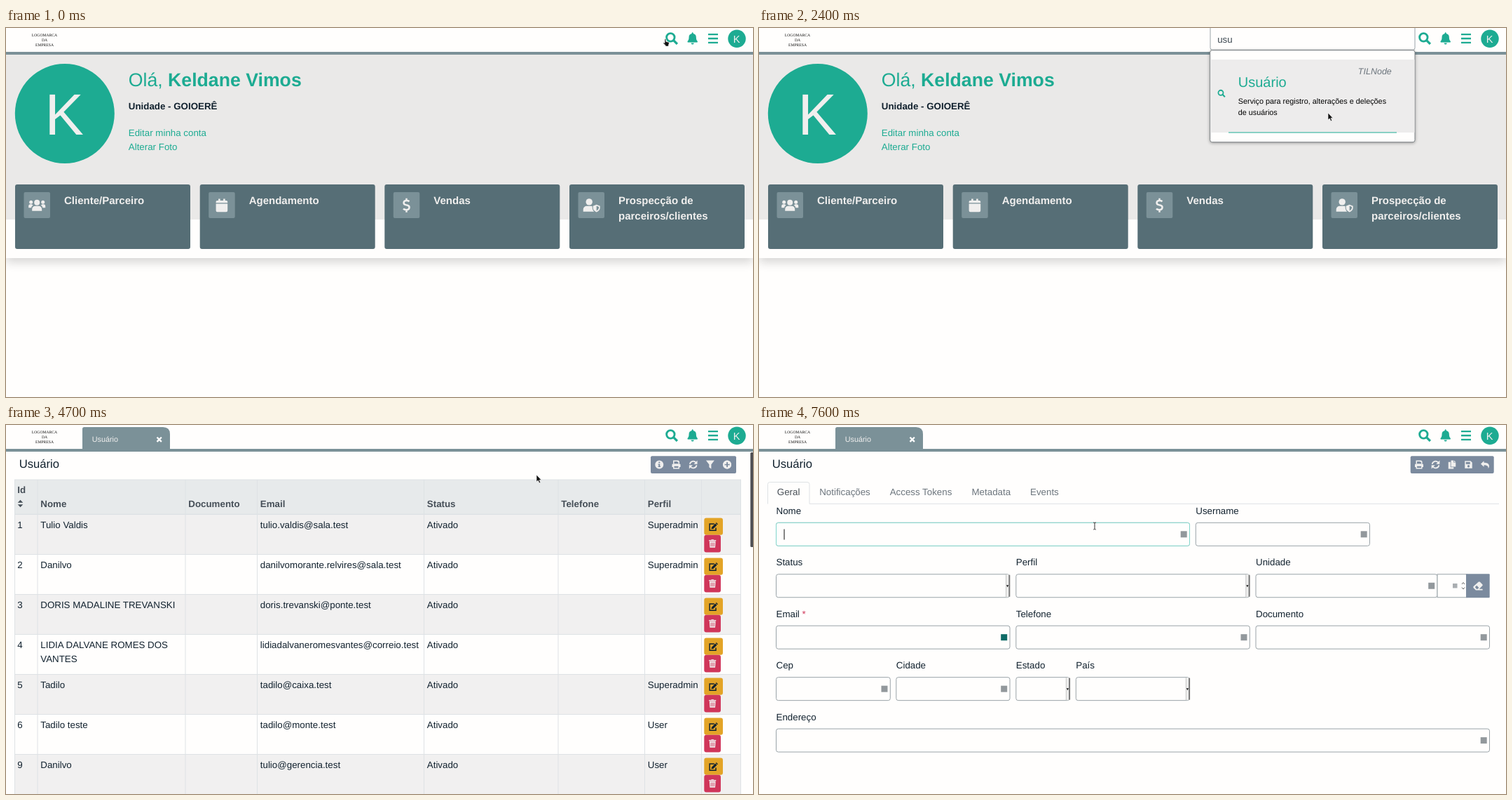
An HTML page that plays this animation: 1066 px wide and 526 px high, repeating every 8000 ms.

```html
<!DOCTYPE html>
<html lang="pt-BR">
<head>
<meta charset="utf-8">
<title>Usuário</title>
<style>
  html, body { margin: 0; width: 100%; height: 100%; overflow: hidden; background: #fffefd; }
  svg { display: block; width: 1066px; height: 526px; }
  text { font-family: "Liberation Sans", Arial, sans-serif; text-rendering: geometricPrecision; white-space: pre; }
</style>
</head>
<body>
<svg id="stage" viewBox="0 0 1066 526"></svg>
<script>
const LOOP = 8000, STEP = 100;
const BG = '#fffefd', TEAL = '#1dab92', INK = '#12222f', SLATE = '#566e76',
  BAR = '#7b9198', TOOL = '#7b8a9e', LINE = '#dee2e5', FIELD = '#9aa3a8', PALE = '#f0efee';

const text = (x, y, str, { size = 13.33, fill = INK, attrs = '' } = {}) =>
  `<text x="${x}" y="${y}" font-size="${size}" fill="${fill}" ${attrs}>${str}</text>`;
const rect = (x, y, w, h, fill, attrs = '') =>
  `<rect x="${x}" y="${y}" width="${w}" height="${h}" fill="${fill}" ${attrs}/>`;
const line = (x1, y1, x2, y2, color, width = 1) =>
  `<path d="M${x1} ${y1}L${x2} ${y2}" stroke="${color}" stroke-width="${width}"/>`;
const group = (id, body, attrs = '') => `<g id="${id}" ${attrs}>${body}</g>`;
const BOLD = 'font-weight="bold"', MID = 'text-anchor="middle"', END = 'text-anchor="end"';

// Icons are centred on 0,0 in a box of about 16 units.
const stroke = (d, w) => `<path d="${d}" fill="none" stroke="currentColor" stroke-width="${w}"/>`;
const fill = d => `<path d="${d}" fill-rule="evenodd"/>`;
const ICONS = {
  search: '<circle cx="-1.5" cy="-1.5" r="5.2" fill="none" stroke="currentColor" stroke-width="2.6"/>' + stroke('M2.2 2.2L7.2 7.2', 3),
  bell: fill('M-1-7.2a1 1 0 0 1 2 0v.7a5 5 0 0 1 4 5C5 2 6 3 6.8 4a1 1 0 0 1-.8 1.6H-6A1 1 0 0 1-6.8 4C-6 3-5 2-5-1.500a5 5 0 0 1 4-5zM-2 6.500H2a2 2 0 0 1-4 0z'),
  bars: stroke('M-7-5.800H7M-7 0H7M-7 5.800H7', 2.3),
  users: '<circle cy="-4" r="4"/><circle cx="-8.500" cy="-4.500" r="2.500"/><circle cx="8.500" cy="-4.500" r="2.500"/>' +
    fill('M-7 8V5.500A4.500 4.500 0 0 1-2.500 1h5A4.500 4.500 0 0 1 7 5.500V8zM-12 3V1a2.500 2.500 0 0 1 2.500-2.500h2L-5.500 0Q-8 1-8 3.500h-4zM12 3V1a2.500 2.500 0 0 0-2.500-2.500h-2L5.500 0Q8 1 8 3.500h4z'),
  calendar: fill('M-8.300-4.500a2 2 0 0 1 2-2.300h1.500V-9.300h2.600v2.500h4.400v-2.500h2.600v2.500h1.500a2 2 0 0 1 2 2.300v1H-8.300zM-8.300-2.300H8.300v9.800a2 2 0 0 1-2 2H-6.300a2 2 0 0 1-2-2z'),
  dollar: stroke('M4-5.500Q2.500-6.700 0-6.700C-5-6.700-5-1.500-1-.6L1.500.1C5.500 1.300 4.500 6.500 0 6.500Q-3 6.500-4.500 5M0-10V-6M0 6V10', 2.5),
  shield: '<circle cx="-3" cy="-4.800" r="4.700"/>' +
    fill('M-11.500 9V6A5 5 0 0 1-6.500 1H0Q1 1 1.500 1.500V4Q2 7 4 9zM2.500 1L7.500-1l5 2v2.500q0 4-5 6.200q-5-2.200-5-6.200zM7.500.7v7q3.300-1.700 3.300-4.500v-1z'),
  info: fill('M-8 0A8 8 0 1 1 8 0A8 8 0 1 1-8 0zM-1.300-5.500h2.600v2.600h-2.600zM-2.200-1.500h3.500v4.500h1v1.800h-4.600V3h1V.3h-.9z'),
  print: fill('M-6-8H4L6-6v5H-6zM-4-6v4h8v-3H2v-1zM-8 0a1.500 1.500 0 0 1 1.500-1.500h13A1.500 1.500 0 0 1 8 0v4.500H6V8H-6V4.500h-2zM-4 3v3h8V3z'),
  sync: stroke('M-6.500-1A6.500 6.500 0 0 1 5-4M6.500 1A6.500 6.500 0 0 1-5 4', 2.3) + fill('M7.800-8v7H1zM-7.800 8V1H-1z'),
  filter: fill('M-8-8H8L2-.500V8L-2 5V-.500z'),
  plus: fill('M-8 0A8 8 0 1 1 8 0A8 8 0 1 1-8 0zM-1.300-5v3.700H-5v2.600h3.700V5h2.600V1.300H5v-2.600H1.300V-5z'),
  copy: fill('M-2-8H3v4h4v8H-2zM4-8l3 3H4zM-7-5h4V5h6v3H-7z'),
  save: fill('M-7-7H4L7-4V7H-7zM-5-5v4h8v-4zM-2.200 3a2.200 2.200 0 1 0 4.400 0a2.200 2.200 0 1 0-4.400 0z'),
  reply: fill('M-8-1.500L-2-7v3.300C4-3.700 8-2 8 3q0 2.500-2 4.300C7 3 4 1-2 1v3.300z'),
  eraser: fill('M-7.500 1L1-6.500h2L7.500-2v1.500L2 5h5.500v2H-3.500L-7.500 3zM-4.700 2L-2.500 5H-.5L1.500 3-2-.500z'),
  edit: stroke('M2-5.500H-7V7H5V2', 2) + fill('M-3 1L4-6 7-3 0 4-3.800 4.500zM4.700-6.700L6-8 9-5 7.700-3.700z'),
  trash: fill('M-7-7h4l1-1h4l1 1h4v2H-7zM-6-4H6L5.300 8H-5.300zM-3.500-2V6h1.200v-8zM-.6-2V6H.6v-8zM2.300-2V6h1.200v-8z'),
  sort: fill('M-5-1.500L0-7 5-1.500zM-5 1.500L0 7 5 1.500z'),
  close: stroke('M-5-5L5 5M5-5L-5 5', 3.6)
};
const icon = (name, x, y, scale, color) =>
  `<g transform="translate(${x} ${y}) scale(${scale})" fill="${color}" color="${color}">${ICONS[name]}</g>`;

const header = rect(0, 0, 1066, 34, BG) + rect(0, 34, 1066, 4, BAR) +
  ['LOGOMARCA', 'DA', 'EMPRESA'].map((s, i) => `<text x="55" y="${12 + i * 6.8}" font-size="5.65" text-anchor="middle" fill="#111" style="font-family:'Liberation Serif',serif">${s}</text>`).join('') +
  icon('search', 950, 15, 1.1, TEAL) + icon('bell', 979.7, 14.7, 1.03, TEAL) + icon('bars', 1009, 15, 1, TEAL) +
  `<circle cx="1043" cy="15.300" r="12.700" fill="${TEAL}"/>` + text(1042.7, 20.5, 'K', { size: 14.6, fill: PALE, attrs: MID });

const card = (x, glyph, ...lines) =>
  rect(x, 223, 250, 92, SLATE, 'rx="3"') + rect(x + 12.5, 234, 37.5, 37, BAR, 'rx="2"') +
  icon(glyph, x + 31.2, 252.7, 1, PALE) +
  lines.map((s, i) => text(x + 70, 250.5 + i * 22.4, s, { size: 15, fill: PALE, attrs: BOLD })).join('');

const home = rect(0, 38, 1066, 290, BG, 'style="filter:drop-shadow(0 6.700px 6.700px rgba(0,0,0,.16))"') +
  rect(0, 38, 1066, 235, '#eae9e8') +
  `<circle cx="83.800" cy="122" r="71" fill="${TEAL}"/>` + text(83.3, 152, 'K', { size: 83, fill: PALE, attrs: MID }) +
  text(174.8, 83, `Olá, <tspan ${BOLD}>Keldane Vimos</tspan>`, { size: 26.67, fill: TEAL }) +
  text(174.8, 116, 'Unidade - GOIOERÊ', { attrs: BOLD }) +
  text(174.8, 154, 'Editar minha conta', { fill: TEAL }) + text(174.8, 174, 'Alterar Foto', { fill: TEAL }) +
  card(13, 'users', 'Cliente/Parceiro') + card(276.7, 'calendar', 'Agendamento') +
  card(540.3, 'dollar', 'Vendas') + card(804, 'shield', 'Prospecção de', 'parceiros/clientes');

const results = rect(643.7, 31.7, 292.3, 131, BG, 'rx="3" stroke="#7d8285" style="filter:drop-shadow(0 1px 2px rgba(0,0,0,.35))"') +
  rect(644.2, 45, 291.3, 104, '#edecec') + line(670, 149, 910, 149, TEAL) +
  icon('search', 660, 93.3, .68, TEAL) +
  text(902.8, 65.5, 'TILNode', { size: 12.5, fill: '#6c757d', attrs: `${END} font-style="italic"` }) +
  text(683.8, 84, 'Usuário', { size: 20, fill: TEAL }) +
  text(683.8, 108, 'Serviço para registro, alterações e deleções', { size: 10.83, fill: '#000' }) +
  text(683.8, 124, 'de usuários', { size: 10.83, fill: '#000' });

const pageTab = `<path d="M109 34V5.500Q109 3 111.500 3H224Q234 3 234 13V34z" fill="${BAR}"/>` +
  text(122.7, 23.5, 'Usuário', { size: 10.83, fill: PALE }) + icon('close', 218.7, 20.7, .64, '#fff');
const title = text(18.7, 61, 'Usuário', { size: 16.67 });

const toolbar = (x, w, pitch, names) => rect(x, 44.3, w, 24.7, TOOL, 'rx="2"') +
  names.map((n, i) => icon(n, x + 12.3 + i * pitch, 56.5, .75, PALE)).join('');
const listTools = x => toolbar(x, 122, 24.2, ['info', 'print', 'sync', 'filter', 'plus']);
const heading = (x, y, s) => text(x, y, s, { fill: '#464f58', attrs: BOLD });

const NAMES = ['Id', 'Nome', 'Documento', 'Email', 'Status', 'Telefone', 'Perfil'];
const loadingX = [16.5, 117.5, 246, 477, 601.3, 741, 917];
const loading = title + listTools(927) + rect(12, 78, 1044, 29.5, '#e7eaeb') +
  line(12, 78, 1056, 78, LINE) + line(12, 107.5, 1056, 107.5, '#d4d9dc') +
  line(597, 78, 597, 107, LINE) + line(1029, 78, 1029, 107, LINE) +
  NAMES.map((s, i) => heading(loadingX[i], 97, s)).join('') + icon('sort', 39.7, 92, .78, '#464f58') +
  text(18.7, 142.7, 'Página de') + text(894, 144.3, 'Mostrando') + text(1020.5, 144.3, 'de') +
  rect(961, 128, 56, 23, '#e9ebee', 'rx="2"') + text(969.5, 144.3, '25') +
  '<path d="M1004 138l2.800 2.800 2.800-2.800" fill="none" stroke="#333" stroke-width="1.300"/>' +
  rect(0, 38, 1066, 488, BG, 'opacity=".5"') +
  `<circle cx="533.500" cy="281.500" r="25.200" fill="none" stroke="#c5e7e2" stroke-width="3"/>
   <path id="arc" d="M515.700 263.700A25.200 25.200 0 0 1 551.300 263.700" fill="none" stroke="${TEAL}" stroke-width="3"/>`;

const EDGES = [12.5, 45, 256, 358.5, 596.5, 788, 911.5, 992.5, 1048.5];
const PEOPLE = [
  [1, 'Tulio Valdis', 'tulio.valdis@sala.test', 'Superadmin'],
  [2, 'Danilvo', 'danilvomorante.relvires@sala.test', 'Superadmin'],
  [3, 'DORIS MADALINE TREVANSKI', 'doris.trevanski@ponte.test', ''],
  [4, 'LIDIA DALVANE ROMES DOS|VANTES', 'lidiadalvaneromesvantes@correio.test', ''],
  [5, 'Tadilo', 'tadilo@caixa.test', 'Superadmin'],
  [6, 'Tadilo teste', 'tadilo@monte.test', 'User'],
  [9, 'Danilvo', 'tulio@gerencia.test', 'User']
];
const cellX = i => EDGES[i] + 4.3;
const person = ([id, name, mail, role], i) => {
  const y = 127.5 + i * 57, base = y + 19.500;
  return rect(12, y, 1037, 57, i % 2 ? BG : '#f1f0f0') + line(12, y, 1049, y, LINE) +
    text(cellX(0) - .5, base, id) +
    name.split('|').map((s, n) => text(cellX(1), base + n * 20, s)).join('') +
    text(cellX(3), base, mail) + text(cellX(4), base, 'Ativado') + text(cellX(6), base, role) +
    rect(996.3, y + 5, 26.7, 24.3, '#e3a427', 'rx="3"') + icon('edit', 1009.3, y + 17.5, .74, INK) +
    rect(996.3, y + 29.3, 23.7, 24.7, '#d0365a', 'rx="3"') + icon('trash', 1008.2, y + 41.5, .72, PALE);
};
const list = title + listTools(920) +
  rect(1017, 44.3, 25, 24.7, '#56657a', 'id="hover" rx="2"') +
  rect(1015.7, 43.1, 27.6, 27.2, 'none', 'id="ring" rx="3" stroke="#7b8a9e" stroke-opacity=".5" stroke-width="2.700"') +
  icon('plus', 1029.1, 56.5, .75, PALE) +
  rect(12, 78, 1037, 49.5, '#e7eaeb') + PEOPLE.map(person).join('') +
  NAMES.map((s, i) => heading(cellX(i) - (i ? 0 : .5), i ? 117 : 97, s)).join('') + icon('sort', 20.5, 112, .76, '#464f58') +
  EDGES.map(x => line(x, 78, x, 526, LINE)).join('') + line(12, 78, 1049, 78, LINE) + line(12, 127, 1049, 127, LINE) +
  rect(1062.3, 39, 5, 135, '#4d4e52', 'rx="1.500"');

// Each field: label, row, left, right, kind.
const FIELDS = [
  ['Nome', 0, 24.5, 614.5], ['Username', 0, 623.3, 871.5],
  ['Status', 1, 24.5, 357.5, 'select'], ['Perfil', 1, 366.8, 699.8, 'select'], ['Unidade', 1, 709, 968],
  ['Email', 2, 24.5, 358], ['Telefone', 2, 366.8, 700.3], ['Documento', 2, 709, 1042.5],
  ['Cep', 3, 24.5, 187.3], ['Cidade', 3, 195.8, 358],
  ['Estado', 3, 366.8, 443.3, 'select'], ['País', 3, 452.3, 614.3, 'select'], ['Endereço', 4, 24.5, 1042.5]
];
const rowY = row => 139.3 + row * 73.45;
const box = (x, y, w, color = FIELD) => rect(x, y, w, 33, BG, `rx="3" stroke="${color}"`);
const field = ([label, row, x1, x2, kind]) => {
  const y = rowY(row);
  return text(x1, y - 12.3, label === 'Email' ? 'Email <tspan fill="#d0365a">*</tspan>' : label) + box(x1, y, x2 - x1) +
    (kind ? rect(x2 - 5, y + .5, 4, 32, '#eeeeed') + line(x2 - 5, y + .5, x2 - 5, y + 32.5, '#bbb', .8) +
      line(x2 - .2, y + 1, x2 - .2, y + 32, '#777', 2) +
      `<path d="M${x2 - 4.500} ${y + 15.500}h3.200l-1.600 3z" fill="#111"/>` : '');
};
const badge = ([label, row, , x2, kind]) =>
  kind ? '' : rect(x2 - 12.8, rowY(row) + 12, 9, 9, label === 'Email' ? '#0f6b66' : '#92989c');

const TABS = [['Notificações', 86.2], ['Access Tokens', 186.7], ['Metadata', 303.5], ['Events', 387]];
const form = title + toolbar(929.7, 119, 23.5, ['print', 'sync', 'copy', 'save', 'reply']) +
  `<path d="M12.500 112.500V84.500Q12.500 81.500 15.500 81.500H69Q72 81.500 72 84.500V112.300H1056" fill="none" stroke="${LINE}"/>` +
  text(25.8, 100, 'Geral', { fill: '#495057' }) + TABS.map(([s, x]) => text(x, 100, s, { fill: '#6c757d' })).join('') +
  FIELDS.map(field).join('') + rect(968, rowY(1), 42, 33, BG, `stroke="${FIELD}"`) +
  '<path d="M1003 227l2-2.500 2 2.500M1003 231.500l2 2.500 2-2.500" fill="none" stroke="#555" stroke-width=".9"/>' +
  rect(1009, rowY(1) - .5, 33.7, 34, TOOL, 'rx="1"') + icon('eraser', 1026, rowY(1) + 16.5, .88, PALE) +
  group('focus', box(24.5, rowY(0), 590, '#7fd6cb') + line(36, 148.5, 36, 163.5, '#222', 1.1)) +
  group('badges', FIELDS.map(badge).join('') + rect(990, rowY(1) + 13.2, 6.5, 6.5, '#a9aeb1'));

const status = '<path d="M0 513H201Q203.500 513 203.500 515.500V526H0z" fill="#2d2d30"/>' +
  `<text x="2" y="524" font-size="9.300" fill="#f2f2f2" style="font-family:'Noto Sans',sans-serif">Read dev.gestao.plus</text>`;

const cursors =
  group('arrow', '<path d="M0 0V10L2.300 8 4 11.800 5.700 11 4.100 7.400H7z" fill="#111" stroke="#fff" stroke-width=".6"/>') +
  group('hand', '<path d="M2.500 1Q3.500 0 4.300 1V4.300L8 5.300Q9 5.600 8.800 7L8 9V11H3.500V9.500L.5 7Q0 6 1.200 5.800L2.500 6.500z" fill="#111" stroke="#fff" stroke-width=".6"/>') +
  group('beam', '<path d="M.5 0Q2 0 2.500.8Q3 0 4.500 0M2.500.8V9.200M.5 10Q2 10 2.500 9.200Q3 10 4.500 10" fill="none" stroke="#555" stroke-width="1.200"/>');

const stage = document.getElementById('stage');
stage.innerHTML = rect(0, 0, 1066, 526, BG) + group('home', home) + group('loading', loading) +
  group('list', list) + group('form', form) + header + group('pageTab', pageTab) +
  group('search', rect(644, -3, 292, 34.3, BG, 'id="searchBox" rx="3"') +
    text(654.2, 20.7, '', { fill: '#3f4a52', attrs: 'id="query"' }) +
    rect(654, 8.5, 1, 15, '#222', 'id="caret"')) +
  group('results', results) + group('status', status) + group('cursor', cursors);

const el = Object.fromEntries([...stage.querySelectorAll('[id]')].map(n => [n.id, n]));
const show = (id, on) => { el[id].style.display = on ? '' : 'none'; };
const between = (t, a, b) => t >= a && t < b;

const PATH = [
  [0, 937.5, 15], [1700, 937.5, 15], [2000, 893, 353], [2100, 893, 353], [2400, 812, 121], [2700, 812, 121],
  [3400, 538, 87], [3800, 538, 87], [4200, 422, 111], [4600, 422, 111], [4700, 757, 71], [4800, 754, 71],
  [4900, 754, 71], [5000, 1037, 73], [5100, 1037, 73], [5400, 1026.5, 56], [6300, 1026.5, 56],
  [6600, 840, 106], [6700, 840, 106], [7500, 476.5, 139], [LOOP, 476.5, 139]
];
function pointer(t) {
  const i = PATH.findIndex(p => p[0] > t), [t0, x0, y0] = PATH[i - 1], [t1, x1, y1] = PATH[i];
  const k = (t - t0) / (t1 - t0);
  return [x0 + (x1 - x0) * k, y0 + (y1 - y0) * k];
}

function render(time) {
  const t = Math.floor(time / STEP) * STEP;
  show('home', t < 2500);
  show('pageTab', t >= 2500);
  show('loading', between(t, 2800, 3600));
  show('list', between(t, 3600, 6300));
  show('form', t >= 6300);
  show('status', between(t, 2500, 2800) || between(t, 5700, 6400));

  show('search', between(t, 600, 2500));
  const width = 292 * Math.min(1, (t - 500) / 300);
  el.searchBox.setAttribute('width', Math.max(0, width));
  el.searchBox.setAttribute('x', 936 - width);
  el.searchBox.setAttribute('stroke', t < 2400 ? '#86d5cd' : FIELD);
  const typed = Math.max(0, Math.min(3, (t - 900) / STEP));
  el.query.textContent = 'usu'.slice(0, typed);
  el.caret.setAttribute('x', 654.2 + [0, 7.4, 14.1, 21.7][typed | 0]);
  show('caret', between(t, 800, 2400));
  show('results', between(t, 1200, 2500));

  el.arc.setAttribute('transform', `rotate(${(t - 3400) * .36 - 39} 533.5 281.5)`);
  show('hover', t >= 5200);
  show('ring', t >= 5700);
  show('focus', t >= 7400);
  show('badges', t >= 7000);

  const kind = t < 1800 || between(t, 5200, 6400) ? 'hand' : t >= 7300 ? 'beam' : 'arrow';
  for (const id of ['arrow', 'hand', 'beam']) show(id, id === kind);
  el.cursor.setAttribute('transform', `translate(${pointer(t)})`);
}

const start = performance.now();
function frame() {
  render((performance.now() - start) % LOOP);
  requestAnimationFrame(frame);
}
frame();
</script>
</body>
</html>
```
